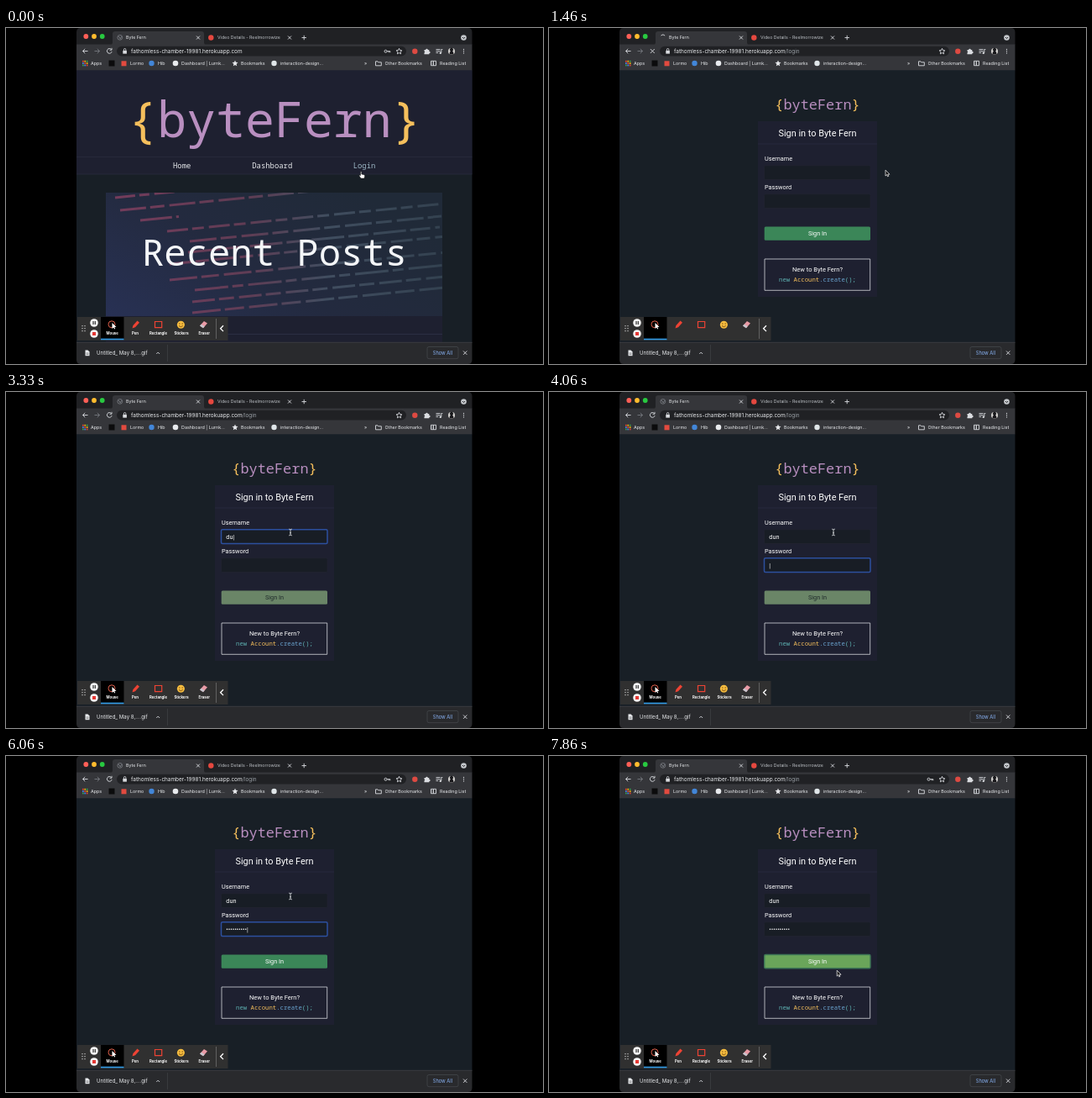
An HTML page for the animation above (8000 ms loop, 640 by 400 pixels).

```html
<!DOCTYPE html>
<html lang="en">
<head>
<meta charset="utf-8">
<title>Byte Fern</title>
<style>
  html, body { margin: 0; width: 100%; height: 100%; overflow: hidden; background: #000; }
  svg { display: block; width: 100vw; height: 100vh; }
  text { font-family: Inter, sans-serif; fill: #e8eaed; white-space: pre; }
  .tab { font-size: 5.25px; }
  .mark { font-size: 5.4px; }
  .mono { font-family: "Noto Sans Mono", monospace; }
  .form { font: 7.3px Roboto, sans-serif; fill: #fff; }
  .mid { text-anchor: middle; }
  .tool { font-size: 4.3px; font-weight: 700; text-anchor: middle; fill: #fff; }
  .line { fill: none; stroke: #dadce0; stroke-width: .9; }
  .dim { stroke: #777a7f; }
  .brace { fill: #f5bf5c; }
  .name { fill: #b98fc0; }
</style>
</head>
<body>
<svg viewBox="0 0 640 400">
  <defs>
    <linearGradient id="photo" x1="0" y1="1" x2="1" y2=".4">
      <stop stop-color="#283154"/><stop offset=".5" stop-color="#232a3f"/><stop offset="1" stop-color="#202a38"/>
    </linearGradient>
    <linearGradient id="ink" gradientUnits="userSpaceOnUse" x1="130" y1="0" x2="520" y2="0">
      <stop stop-color="#8f4264"/><stop offset=".4" stop-color="#75435c"/><stop offset=".65" stop-color="#4b5a6c"/><stop offset="1" stop-color="#3a4a58"/>
    </linearGradient>
    <clipPath id="frame"><path d="M119 196h401v147H119z"/></clipPath>
  </defs>
  <path fill="#181f26" d="M84 50h471.500v325H84z"/>

  <g id="home">
    <path fill="#1e2030" d="M84 50h471.500v124H84z"/>
    <path stroke="#292b3d" stroke-width=".8" d="M84 153.500h471.500M84 174h471.500"/>
    <text class="mono mid name" x="320" y="129.700" font-size="58.2"><tspan class="brace">{</tspan>byteFern<tspan class="brace">}</tspan></text>
    <g font-size="8.9">
      <text class="mono" x="199" y="167">Home</text>
      <text class="mono" x="293.300" y="167">Dashboard</text>
      <text class="mono" x="413.700" y="167" id="link">Login</text>
    </g>
    <path fill="#1e2030" d="M119 343h401v32H119z"/>
    <path stroke="#2b2e43" d="M119 364.500h401"/>
    <path fill="url(#photo)" d="M119 196h401v147H119z"/>
    <g id="rows" clip-path="url(#frame)" fill="none" stroke="url(#ink)" stroke-width="3" opacity=".75"></g>
    <text class="mono mid" x="320" y="283.300" font-size="43.9" style="fill:#f4f6f8">Recent Posts</text>
  </g>

  <g id="login">
    <text class="mono mid name" x="320" y="96.500" font-size="16.9"><tspan class="brace">{</tspan>byteFern<tspan class="brace">}</tspan></text>
    <path fill="#1e2030" d="M249 111h142v209H249z"/>
    <path stroke="#2a2d40" stroke-width=".8" d="M249 138h142"/>
    <text class="form mid" x="320" y="129" style="font-size:10.9px">Sign in to Byte Fern</text>
    <text class="form" x="257" y="157.800" font-weight="500">Username</text>
    <text class="form" x="257" y="191.600" font-weight="500">Password</text>
    <rect id="userBox" x="256.500" y="163.800" width="126.500" height="16.700" rx="1.500" fill="#181d25"/>
    <rect id="passBox" x="256.500" y="197.800" width="126.500" height="16.700" rx="1.500" fill="#181d25"/>
    <text class="form" id="user" x="262.300" y="174.800"></text>
    <text class="form" id="pass" x="262.300" y="208.600"></text>
    <rect id="button" x="256.700" y="236.500" width="126.300" height="16.300" rx="1.500"/>
    <text class="form mid" id="buttonText" x="320" y="247.200">Sign In</text>
    <path fill="none" stroke="#d5d7dc" stroke-width=".8" d="M257 275h125.700v37.300H257z"/>
    <text class="form mid" x="320" y="290.300" style="font-size:7.500px">New to Byte Fern?</text>
    <text class="mono mid" x="320" y="302" font-size="7.3" style="fill:#6ba4d0"><tspan fill="#5fb3b3">new</tspan> <tspan class="brace">Account</tspan>.create<tspan fill="#5fb3b3">();</tspan></text>
  </g>

  <!-- browser frame -->
  <path fill="#202124" d="M84 20V5q0-5 5-5h461.500q5 0 5 5v15z"/>
  <path fill="#35363a" d="M84 19.500h471.500v30.700H84zM124 20q3 0 3-3V7q0-3 3-3h103q3 0 3 3v10q0 3 3 3z"/>
  <rect x="132" y="21.800" width="345" height="11.600" rx="5.800" fill="#202124"/>
  <circle cx="95.300" cy="10" r="2.900" fill="#ff5f57"/><circle cx="105" cy="10" r="2.900" fill="#febc2e"/><circle cx="114.700" cy="10" r="2.900" fill="#28c840"/>
  <g id="globe" class="line dim"><circle cx="135.800" cy="11.300" r="2.900"/><path d="M133.500 10l2 1 .5 2 2-3"/></g>
  <path id="spin" class="line" d="M133.500 9a3.200 3.200 0 0 1 4.600 0"/>
  <text class="tab" x="143" y="13.200">Byte Fern</text>
  <circle cx="244.300" cy="11.500" r="3.200" fill="#e5483f"/>
  <text class="tab" x="252" y="13.200" style="fill:#bdc1c6">Video Details - Reelmorrowize</text>
  <path class="line" d="M227 9.500l4 4m0-4l-4 4M336 9.500l4 4m0-4l-4 4M352.500 11.500h5.400m-2.700-2.700v5.400"/>
  <circle cx="545.500" cy="11.500" r="3.300" fill="#c4c7cb"/>
  <path stroke="#202124" fill="none" d="M544 11l1.500 1.500L547 11"/>
  <path class="line" d="M97.500 27.500h-6m2.700-2.700l-2.700 2.700 2.700 2.700"/>
  <path class="line dim" d="M105.500 27.500h6m-2.700-2.700l2.700 2.700-2.700 2.700"/>
  <path id="reload" class="line" d="M125.500 25.500a2.900 2.900 0 1 0 .6 2.600M126 23.800v2.400h-2.400"/>
  <path id="stop" class="line" d="M120.800 25l5 5m0-5l-5 5"/>
  <path fill="#dadce0" d="M139.300 27h4.600v3.600h-4.600z"/><path class="line" d="M140.400 27v-1.300a1.200 1.200 0 0 1 2.400 0V27"/>
  <text x="149" y="29.900" font-size="6.45">fathomless-chamber-19981.herokuapp.com<tspan id="path" fill="#9aa0a6">/login</tspan></text>
  <g id="key" class="line"><circle cx="452.500" cy="27.700" r="1.500"/><path d="M454 27.700h3.800v1.500M456.200 27.700v1.500"/></g>
  <path class="line" d="M468.500 24.300l1 2.200 2.400.3-1.800 1.600.5 2.400-2.100-1.200-2.100 1.200.5-2.400-1.800-1.600 2.400-.3z"/>
  <circle cx="487.300" cy="27.800" r="3.200" fill="#dd4a42"/>
  <path fill="#dadce0" d="M498.500 26h1.700a1.300 1.300 0 0 1 2.600 0h1.500v1.700a1.300 1.300 0 0 1 0 2.600v1h-5.800v-1.700a1.200 1.200 0 0 0 0-2z"/>
  <path class="line" d="M512.500 25.500h5M512.500 27.500h5M512.500 29.500h2.700M518.800 29.500v-4h1.500"/><circle cx="517.800" cy="29.700" r="1.200" fill="#dadce0"/>
  <circle cx="531" cy="27.700" r="4" fill="#d5d3d0"/><path fill="#17171a" d="M528.500 31.400q0-3 1.300-3.600a2 2.400 0 1 1 2.400 0q1.300.6 1.300 3.600z"/>
  <path stroke="#dadce0" stroke-width="1.300" stroke-linecap="round" stroke-dasharray="0 2.200" d="M545.500 25.500v5"/>
  <g id="apps"></g>
  <rect x="122.500" y="38.500" width="7" height="7" fill="#0c0c0d"/>
  <rect x="137.500" y="39.300" width="6" height="6" fill="#e24a3f"/>
  <circle cx="173.500" cy="42" r="3.200" fill="#4286d8"/>
  <circle cx="202" cy="42" r="3.300" fill="#e8eaed"/>
  <path fill="#e8eaed" d="M273 38.500l1 2.300 2.500.3-1.900 1.700.6 2.500-2.200-1.300-2.200 1.300.6-2.500-1.900-1.700 2.500-.3z"/>
  <circle cx="319.500" cy="42" r="3.200" fill="#dfe5e8"/>
  <text class="mark" x="101" y="44">Apps</text><text class="mark" x="148" y="44">Lormo</text>
  <text class="mark" x="181" y="44">Hib</text><text class="mark" x="209" y="44">Dashboard | Lurnk...</text>
  <text class="mark" x="280" y="44">Bookmarks</text><text class="mark" x="327" y="44">interaction-design...</text>
  <text class="mark" x="427" y="44">»</text><text class="mark" x="451.500" y="44">Other Bookmarks</text><text class="mark" x="517" y="44">Reading List</text>
  <path class="line" d="M440.500 39.800h2.500l.8 1h3.500v4h-6.800zM506.500 39.300h6v5.400h-6zM509.500 39.300v5.400M507.500 41h1M507.500 43h1"/>

  <!-- downloads -->
  <path fill="#292a2d" d="M84 374h471.500v21q0 5-5 5H89q-5 0-5-5z"/>
  <path stroke="#45474b" stroke-width=".6" d="M84 374.300h471.500M192.500 377v20"/>
  <path fill="#e8eaed" d="M94.500 383.500h3l2 2v4.800h-5z"/><path stroke="#555" stroke-width=".6" d="M95.500 387h3M95.500 388.500h3"/>
  <text x="108" y="389" font-size="6.1">Untitled_ May 8,....gif</text>
  <path class="line" d="M179.300 388l1.900-1.900 1.900 1.900M545 384.500l4.400 4.400m0-4.400l-4.400 4.400"/>
  <rect x="502" y="379.500" width="37" height="14.200" rx="2" fill="none" stroke="#484b50" stroke-width=".7"/>
  <text class="mid" x="520.400" y="388.700" font-size="5.7" style="fill:#8ab4f8">Show All</text>

  <!-- drawing tools -->
  <path fill="#303030" d="M85 344h179.500v28H85z"/>
  <path fill="#000" d="M113 344h27.500v27H113z"/><path stroke="#2f9be8" stroke-width="1.600" d="M113 370.500h27.500"/>
  <path stroke="#bbb" stroke-width="1.300" stroke-dasharray="1.300 1.700" d="M91 354v8M94 354v8"/>
  <circle cx="105" cy="351" r="4.800" fill="#f5f5f5"/><path stroke="#333" stroke-width="1.200" d="M104 349v4M106.300 349v4"/>
  <circle cx="105" cy="364" r="4.800" fill="#f5f5f5"/><path fill="#e53935" d="M103 362h4v4h-4z"/>
  <circle cx="126" cy="352.800" r="4" fill="none" stroke="#e0604c"/><path fill="#fff" d="M126.500 351v7l1.700-1.500 1 2 1-.5-.9-2h2.200z"/>
  <path fill="#ee4334" d="M150.500 357.500l1-3.500 5-5.500 2.500 2.300-5 5.400z"/>
  <path fill="none" stroke="#ee4334" stroke-width="1.200" d="M177.500 349.500h8.200v7.200h-8.200z"/>
  <circle cx="208.400" cy="353.200" r="4.500" fill="#f6bd3f"/><path fill="none" stroke="#70420d" stroke-width=".9" d="M206 352h1.500M209.500 352h1.500M206 354.500q2.400 2.500 4.800 0"/>
  <path fill="#e99aa5" d="M231 354.500l5-5.500 4 2.500-5 5.800z"/><path fill="#c6c6ce" d="M231 354.500l1.700-1.800 4 2.600-1.700 2z"/>
  <path stroke="#777" stroke-width=".7" d="M250.500 346v24"/><path fill="none" stroke="#fff" stroke-width="1.300" d="M259 354.300l-3.400 3.400 3.400 3.400"/>
  <g id="labels">
    <text class="tool" x="126.700" y="365">Mouse</text><text class="tool" x="154" y="365">Pen</text>
    <text class="tool" x="181.500" y="365">Rectangle</text><text class="tool" x="209" y="365">Stickers</text><text class="tool" x="236.300" y="365">Eraser</text>
  </g>

  <g id="cursor">
    <path id="hand" fill="#fff" stroke="#111" stroke-width=".5" d="M-1.500-4q.8-.6 1.300.2V-1l3 .7q1 .3.8 1.500L3 4h-4L-3.200.8q.2-1.200 1.700-.2z"/>
    <path id="arrow" fill="#111" stroke="#fff" stroke-width=".7" d="M-1.800-3.800v6.900l1.600-1.500 1 2.300 1.100-.5-1-2.200h2.200z"/>
    <path id="beam" fill="none" stroke="#d5d8dc" stroke-width=".9" d="M-1.800-3.800q1.800 0 1.800 1v5.600q0 1-1.800 1M1.800-3.800Q0-3.800 0-2.800M0 2.800q0 1 1.800 1M-1 .8h2"/>
  </g>
</svg>
<script>
const $ = id => document.getElementById(id);
const set = (id, attrs) => { for (const k in attrs) $(id).setAttribute(k, attrs[k]); };
const show = (id, on) => set(id, { visibility: on ? 'visible' : 'hidden' });
const write = (id, s) => { if ($(id).textContent !== s) $(id).textContent = s; };

// Slanted bars for the photo: start x, start y, length
const bars = [[130, 202, 140], [136, 217, 330], [160, 229, 46], [192, 242, 325], [219, 254, 300], [217, 267, 300],
  [195, 281, 325], [195, 300, 325], [225, 312, 295], [222, 326, 298], [222, 339, 298]];
$('rows').innerHTML = bars.map(([x, y, w], i) =>
  `<path d="M${x} ${y}l${w} ${-w * .1}" stroke-dasharray="${24 + i * 7 % 20} 5 ${12 + i * 5 % 13} 6"/>`).join('');
$('apps').innerHTML = ['#ea4335', '#fbbc04', '#34a853', '#4285f4', '#ea4335', '#fbbc04', '#34a853', '#4285f4', '#ea4335'].map((c, i) =>
  `<rect x="${91 + i % 3 * 2.4}" y="${38.8 + Math.floor(i / 3) * 2.4}" width="1.7" height="1.7" fill="${c}"/>`).join('');

// Pointer path: time, x, y
const moves = [[0, 424, 175], [330, 425, 173], [730, 428, 168], [1330, 428, 168], [1460, 403, 173],
  [1860, 339, 167], [7130, 339, 167], [7860, 345, 259], [8000, 345, 259]];
function pointer(t) {
  const i = moves.findIndex(m => m[0] > t);
  const [t0, x0, y0] = moves[i - 1], [t1, x1, y1] = moves[i];
  const k = (t - t0) / (t1 - t0);
  return [x0 + (x1 - x0) * k, y0 + (y1 - y0) * k];
}

function focusBox(id, on) {
  set(id, { stroke: on ? '#2c4f9e' : '#242735', 'stroke-width': on ? 1.5 : .5 });
}

function draw(t) {
  const loading = t >= 730 && t < 1600, onLogin = t >= 1330;
  show('home', !onLogin);
  show('login', onLogin);
  show('globe', !loading);
  show('reload', !loading);
  show('spin', loading);
  show('stop', loading);
  show('path', t >= 730);
  show('labels', !(onLogin && loading));
  set('spin', { transform: `rotate(${(t - 1460) * .8} 135.8 11.3)` });
  $('link').style.fill = t < 330 ? '#9db8c6' : '#6bb0bd';

  const letters = [3060, 3200, 3460].filter(at => t >= at).length;
  const dots = Math.max(0, Math.min(10, Math.floor((t - 4460) / 150) + 1));
  const inUser = t >= 2000 && t < 4000, inPass = t >= 4000 && t < 6400, inButton = t >= 6400;
  const caret = (t < 3000 || t > 6000) && t % 1000 > 500 ? '' : '|';
  write('user', 'dun'.slice(0, letters) + (inUser ? caret : ''));
  write('pass', '•'.repeat(dots) + (inPass ? caret : ''));
  focusBox('userBox', inUser);
  focusBox('passBox', inPass);
  show('key', t < 730 || dots > 0);

  const disabled = t >= 1600 && dots < 8;
  set('button', {
    fill: inButton ? '#6aa55a' : disabled ? '#6a8567' : '#3b8658',
    stroke: inButton ? '#3c7556' : 'none', 'stroke-width': 1.4
  });
  $('buttonText').style.fill = disabled ? '#1f2a2b' : '#fff';

  const [x, y] = pointer(t);
  const hand = !onLogin || (y > 236 && y < 253);
  const beam = onLogin && x < 383 && ((y > 163 && y < 181) || (y > 197 && y < 215));
  set('cursor', { transform: `translate(${x} ${y})` });
  show('hand', hand);
  show('beam', beam);
  show('arrow', !hand && !beam);
}

const start = performance.now();
(function tick() {
  draw((performance.now() - start) % 8000);
  requestAnimationFrame(tick);
})();
</script>
</body>
</html>
```
